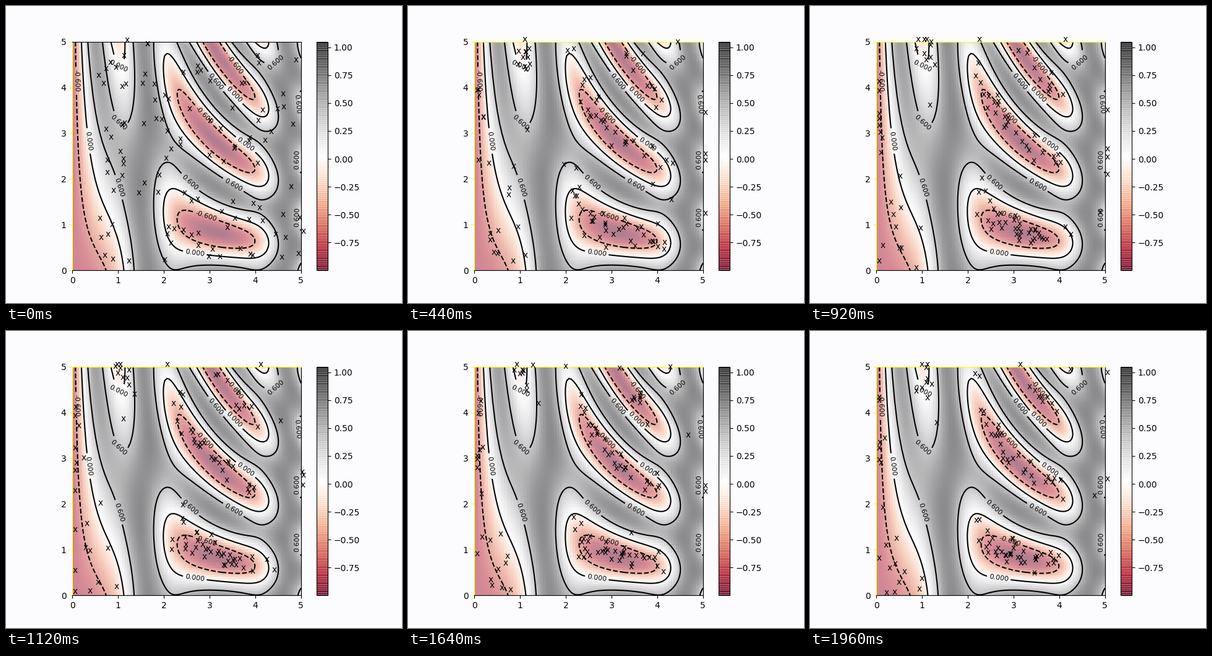
These frames come from a looping animation (640 px wide and 480 px high, 2000 ms). A matplotlib script:

```python
import numpy as np
import matplotlib.pyplot as plt
from matplotlib.animation import FuncAnimation

FRAMES, INTERVAL = 50, 40
AGENTS, SIDE = 110, 5.0
HEAT = 0.2
PAPER = "#fcfcff"


def height(x, y):
    return np.sin(x) ** 10 + np.cos(10 + y * x) * np.cos(x)


def search():
    """Noisy descent: agents on high ground take longer steps."""
    rng = np.random.default_rng(11)
    spots = rng.uniform((0.4, 0.1), (SIDE, SIDE), (AGENTS, 2))
    paths = [spots]
    for _ in range(FRAMES - 1):
        level = height(*spots.T)
        reach = 0.1 + 0.35 * np.maximum(level, 0)
        step = reach[:, None] * rng.normal(size=spots.shape)
        trial = np.clip(spots + step, 0, SIDE)
        rise = np.maximum(height(*trial.T) - level, 0)
        accept = rng.random(AGENTS) < np.exp(-rise / HEAT)
        spots = np.where(accept[:, None], trial, spots)
        paths.append(spots)
    return paths


paths = search()

fig, ax = plt.subplots(figsize=(6.4, 4.8), dpi=100, facecolor=PAPER)
grid = np.linspace(0, SIDE, 100)
X, Y = np.meshgrid(grid, grid)
Z = height(X, Y)

image = ax.imshow(Z, extent=[0, SIDE, 0, SIDE], origin="lower",
                  cmap="RdGy", alpha=0.5)
bar = fig.colorbar(image, ax=ax)
bar.solids.set(edgecolor="face", linewidth=0.5)  # overlapping edges give stripes

lines = ax.contour(X, Y, Z, levels=[-0.6, 0, 0.6], colors="black",
                   algorithm="mpl2014")
for label in lines.clabel(fontsize=8, fmt="%1.3f"):
    label.set_clip_on(True)

ax.set_facecolor(PAPER)
ax.tick_params(axis="y", color="yellow")
ax.spines["left"].set_color("yellow")

marks = [ax.text(0, 0, "x", fontsize=10, zorder=5) for _ in range(AGENTS)]


def update(k):
    for mark, spot in zip(marks, paths[k]):
        mark.set_position(spot)
    ax.spines["top"].set_color("yellow" if k else "black")
    return marks


anim = FuncAnimation(fig, update, frames=FRAMES, interval=INTERVAL,
                     repeat=True, repeat_delay=0)
plt.show()
```
